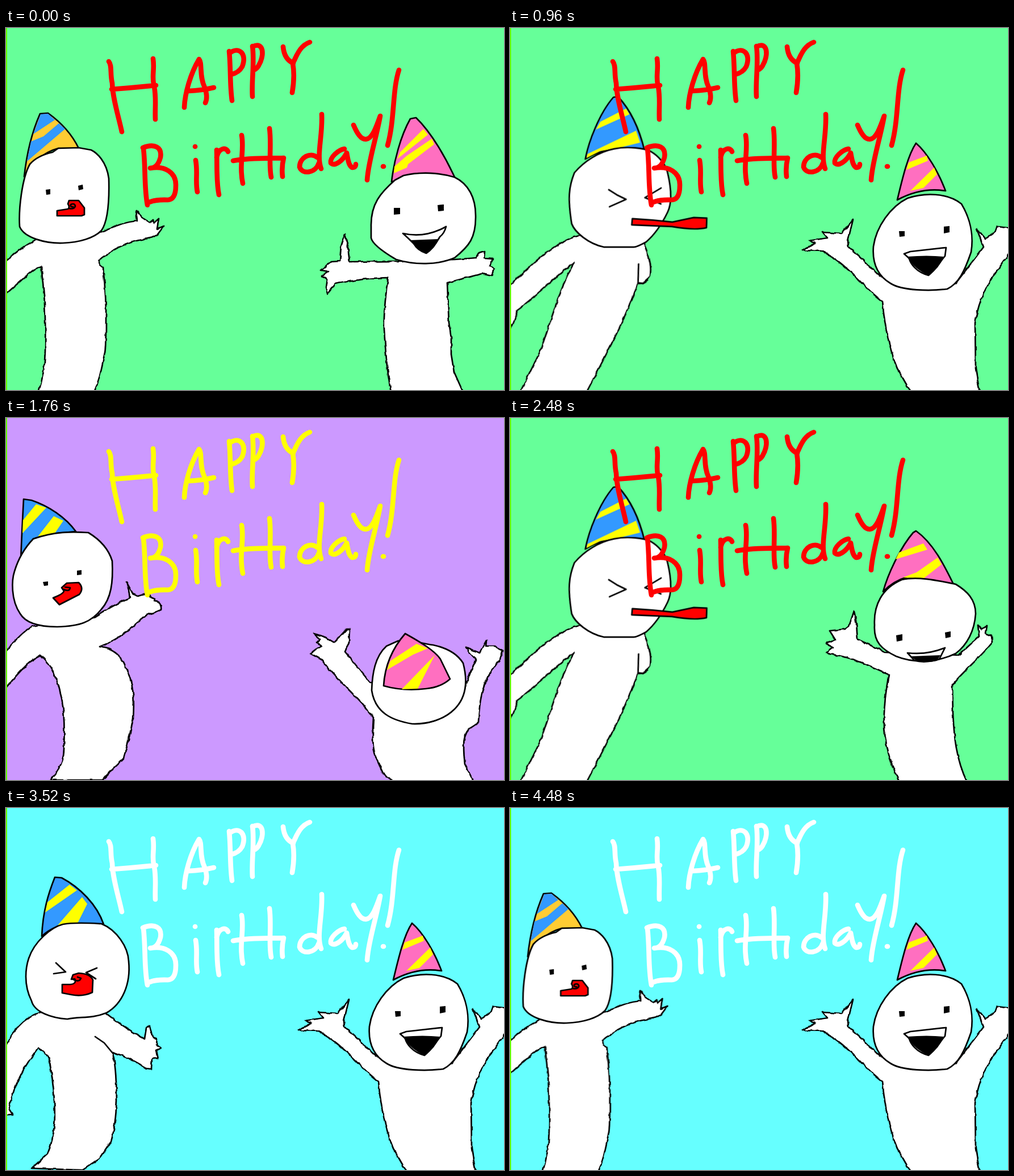
Write an HTML page without scripts that moves like this. It is 877 px wide and 638 px high and loops after 4.64 s.

```html
<!DOCTYPE html>
<html lang="en">
<head>
<meta charset="utf-8">
<title>Happy Birthday!</title>
<style>
html, body { margin: 0; width: 100%; height: 100%; overflow: hidden; }
svg { display: block; width: 100%; height: 100%; animation: disco 4640ms step-end infinite; }

/* one tick is 80 ms, 58 ticks in the loop */
@keyframes disco {
  0%, 10.34%, 20.68%, 31.03%, 41.37%, 51.72%, 62.06%, 72.41%, 82.75%, 93.1% { background: #6f9; color: #f00; }
  3.44%, 13.79%, 24.13%, 34.48%, 44.82%, 55.17%, 65.51%, 75.86%, 86.2%, 96.55% { background: #6ff; color: #fff; }
  6.89%, 17.24%, 27.58%, 37.93%, 48.27%, 58.62%, 68.96%, 79.31%, 89.65% { background: #c9f; color: #ff0; }
}

.pose { visibility: hidden; animation: 4640ms step-end infinite; }
.rest { animation-name: rest; }
.back { animation-name: back; }
.inhale { animation-name: inhale; }
.blow { animation-name: blow; }
.half { animation-name: half; }
.full { animation-name: full; }
.smile { animation-name: smile; }
.dip { animation-name: dip; }
.bow { animation-name: bow; }
.cheer { animation-name: cheer; }

@keyframes rest {
  0%, 25.86%, 58.62%, 91.37% { visibility: visible; }
  3.44%, 36.2%, 68.96% { visibility: hidden; }
}
@keyframes back {
  3.44%, 36.2%, 68.96% { visibility: visible; }
  0%, 8.62%, 41.37%, 74.13% { visibility: hidden; }
}
@keyframes inhale {
  8.62%, 41.37%, 74.13% { visibility: visible; }
  0%, 12.06%, 44.82%, 77.58% { visibility: hidden; }
}
@keyframes blow {
  12.06%, 44.82%, 77.58% { visibility: visible; }
  0%, 25.86%, 58.62%, 91.37% { visibility: hidden; }
}
@keyframes half {
  12.06%, 44.82%, 77.58% { visibility: visible; }
  0%, 15.51%, 48.27%, 81.03% { visibility: hidden; }
}
@keyframes full {
  15.51%, 48.27%, 81.03% { visibility: visible; }
  0%, 25.86%, 58.62%, 91.37% { visibility: hidden; }
}
@keyframes smile {
  0%, 25.86%, 51.72%, 77.58% { visibility: visible; }
  1.72%, 27.58%, 53.44%, 79.31% { visibility: hidden; }
}
@keyframes dip {
  1.72%, 27.58%, 53.44%, 79.31% { visibility: visible; }
  0%, 3.44%, 29.31%, 55.17%, 81.03% { visibility: hidden; }
}
@keyframes bow {
  3.44%, 29.31%, 55.17%, 81.03% { visibility: visible; }
  0%, 15.51%, 41.37%, 67.24%, 93.1% { visibility: hidden; }
}
@keyframes cheer {
  15.51%, 41.37%, 67.24%, 93.1% { visibility: visible; }
  0%, 25.86%, 51.72%, 77.58% { visibility: hidden; }
}

.lean { transform-origin: 0 638px; animation: lean 4640ms step-end infinite; }
@keyframes lean {
  0%, 32.75%, 65.51% { transform: skewX(0deg); }
  12.06%, 44.82%, 77.58% { transform: skewX(0deg); animation-timing-function: steps(5); }
  20.68%, 53.44%, 86.2% { transform: skewX(-5deg); }
  25.86%, 58.62%, 91.37% { transform: skewX(-2.1deg); animation-timing-function: steps(3); }
  31.03%, 63.79%, 96.55%, 100% { transform: skewX(.12deg); }
}

path { fill: #fff; stroke: #000; stroke-width: 2.7; stroke-linejoin: round; stroke-linecap: round; }
.pose > path:first-child { filter: url(#shaky); }
.line { fill: none; }
.blue { fill: #39f; }
.gold { fill: #fc3; }
.pink { fill: #ff6fc0; }
.red { fill: #f00; }
.ink { fill: #000; stroke: none; }
.dye, .sky { fill: #ff0; stroke: none; }
.sky { fill: #39f; }
.words path { fill: none; stroke: currentColor; stroke-width: 8.6; }
</style>
</head>
<body>
<svg viewBox="0 0 877 638" preserveAspectRatio="none">

<!-- unsteady hand for the body outlines -->
<filter id="shaky" filterUnits="userSpaceOnUse" x="-60" y="0" width="960" height="650" color-interpolation-filters="sRGB">
  <feTurbulence type="fractalNoise" baseFrequency=".11" seed="4"/>
  <feDisplacementMap in="SourceGraphic" scale="5" xChannelSelector="R" yChannelSelector="G"/>
</filter>

<g class="lean">
  <g class="pose rest">
    <path d="M-8 417Q20 391 53 373L165 360L188 352Q204 343 230 340L229 330L231 322L238 333L253 343L259 338L261 343L269 336L266 354L278 349L266 365L258 369C235 374 215 377 190 391L163 410L166 418L171 423C174 450 177 480 176 520Q176 560 174 572C168 600 165 620 155 642H57Q68 610 69 570C70 520 68 480 66 460L62 420Q52 423 44 430Q25 446-8 476Z"/>
    <path class="gold" d="M32 262C36 225 45 185 60 151L74 150C95 165 115 185 128 212L92 212Q55 222 32 262Z"/>
    <path class="sky" d="M61 152L74 151L86 162L48 187ZM44 200L66 191L93 168L104 178L37 235Z"/>
    <path d="M82 219Q55 225 42 240C28 265 22 320 24 350C32 370 70 380 100 379C130 378 155 370 168 357C180 340 182 300 181 265C177 235 160 220 150 215L128 211L92 212L82 219Z"/>
    <path class="ink" d="M70 285l8-1v9l-7 1zM127 278l8-2 1 8-8 2z"/>
    <path class="red" d="M90 322L109 319Q113 316 109 310L111 304L128 304L138 317V329L133 331L90 331Z"/>
    <path class="line" d="M111 318Q120 320 122 314Q121 308 114 311Q113 316 118 315"/>
  </g>

  <g class="pose back">
    <path d="M-8 420Q20 385 45 367L154 352Q190 329 218 317L216 303L212 289L223 309L233 313L250 308L255 316L262 319L261 323Q275 324 273 338Q262 343 254 345Q240 350 232 360Q200 390 165 403L181 407Q203 417 210 437C226 470 226 500 224 530C216 570 211 585 207 600L188 618L170 638H78L88 626Q103 605 102 580Q104 530 99 500C92 460 80 435 60 418C38 430 15 455-8 488Z"/>
    <path class="blue" d="M26 250Q28 200 31 143L45 145C75 155 105 175 123 200L80 204L48 213Z"/>
    <path class="dye" d="M53 152L71 158L29 203L30 180ZM84 173L101 181L86 203L56 209Z"/>
    <path d="M48 213C85 200 115 200 145 202Q178 222 187 252C189 290 185 318 168 337C150 360 130 367 90 368C60 368 35 362 25 345C8 320 10 285 15 270Q25 237 48 213Z"/>
    <path class="ink" d="M65 289l9-1v7l-7 1zM125 269l8-1v8l-8 1z"/>
    <path class="red" d="M83 317Q101 310 102 305L98 299L107 291L128 290Q138 300 129 311L94 329Z"/>
    <path class="line" d="M101 302Q112 307 113 299L104 298"/>
  </g>

  <g class="pose inhale">
    <path d="M-8 436C10 392 30 370 60 360L175 361Q205 385 244 407L247 388L253 384L258 404L266 408L265 417L273 423L264 427L267 441L257 442L256 460L247 459Q225 443 187 430Q194 450 195 515Q193 560 185 588L165 618L135 638L45 635L73 610C90 570 86 530 84 500C80 460 76 435 69 433L57 422C40 445 15 480 5 530L12 541L-8 542Z"/>
    <path class="line" d="M157 403L173 414L187 431"/>
    <path class="blue" d="M63 226C65 180 75 150 86 122L98 123C130 140 160 170 172 205L120 203Q85 205 63 226Z"/>
    <path class="dye" d="M73 166L112 135L125 145L69 184ZM134 157L143 169L126 203L89 209Z"/>
    <path d="M100 205C120 201 150 203 168 204C195 215 215 245 216 270C220 310 205 345 177 361C150 372 130 367 108 372C80 370 50 360 45 340C30 310 35 280 40 265C50 235 80 210 100 205Z"/>
    <path class="line" d="M88 273L105 289L84 292M160 282L141 290L158 301"/>
    <path class="red" d="M99 311L113 311Q125 310 121 301L115 302L118 294L128 291Q148 292 153 303L152 325Q135 333 115 329L99 326Z"/>
    <path class="line" d="M118 302Q129 308 132 300L126 298"/>
  </g>

  <g class="pose blow">
    <path d="M-40 474L-3 440C25 410 60 375 98 366L213 380Q232 415 229 438Q222 452 208 450C190 520 168 565 135 642H18L45 576C62 520 69 465 93 414C62 437 30 475-1 498L1 503L-6 525L-14 532Z"/>
    <path class="line" d="M207 416L209 449L218 450"/>
    <path class="blue" d="M97 231C100 200 115 150 137 122L145 121Q180 155 200 216Q165 208 146 213Q120 216 97 231Z"/>
    <path class="dye" d="M118 165L161 142L168 152L111 179ZM100 222L182 181L191 202L155 211L122 217L99 229Z"/>
    <path d="M146 213C170 208 200 212 210 217C225 225 240 240 245 258C255 290 256 310 250 325C240 350 230 365 217 377Q200 387 195 386L143 386C115 380 90 360 83 345C72 300 72 280 80 255C95 235 120 218 146 213Z"/>
    <path class="line" d="M143 285L158 294L175 302L147 315M235 282L208 299L237 310"/>
    <path class="red pose half" d="M178 338L217 336Q226 330 222 324L211 322L218 317L245 317L256 333V342L240 348Q215 350 200 357L172 358Z"/>
    <path class="red pose full" d="M189 336Q225 338 260 342L297 334L320 335L321 352Q300 357 260 350L189 347Z"/>
  </g>
</g>

<g class="pose smile">
  <path d="M687 411L605 412L602 385L597 363L590 385L588 411L572 412L554 427L568 429L556 437L566 443L564 457L567 468L579 451C610 445 645 440 673 440C668 470 665 510 666 530C668 570 672 610 678 642H805L789 606L784 575V545L780 520L777 449L838 433L855 437L859 425L852 419L857 407L842 406L843 394L833 397L828 405L790 408Z"/>
  <path class="pink" d="M679 271C683 235 695 190 712 160L722 158C750 185 775 230 791 265Q740 250 679 271Z"/>
  <path class="dye" d="M694 219L735 178L743 188L689 231ZM750 195L754 205L708 240L706 246L683 256L684 244L706 225Z"/>
  <path d="M700 260C730 253 765 255 790 263C815 275 827 300 827 330C828 370 815 385 790 405C760 418 720 418 687 408C665 395 645 380 643 370V350C642 310 660 290 685 268Z"/>
  <path class="ink" d="M683 317h11v11l-11 1zM760 312l11-1v11l-10 1z"/>
  <path d="M699 362Q738 371 775 350Q772 362 764 368Q752 390 740 397Q725 392 718 380Q708 370 699 362Z"/>
  <path class="ink" d="M711 374L762 372L754 386L740 398L727 391Z"/>
</g>

<g class="pose dip">
  <path d="M667 452C640 440 610 425 580 419L563 416L558 412L568 404L557 398L573 391L563 375L590 372L597 367L606 340L610 362L612 390L660 412L790 418L826 385L824 365L830 372L840 366L838 380L848 384L849 396C830 420 800 445 779 470L780 520C782 560 785 600 805 642H686C665 600 657 560 659 520C660 490 664 470 667 452Z"/>
  <path class="pink" d="M657 306C667 270 690 225 710 202L715 199C745 220 765 260 781 293Q740 285 700 280Q675 287 657 306Z"/>
  <path class="dye" d="M685 237L728 221L735 232L679 249ZM753 246L760 258L728 283L692 281L716 272Z"/>
  <path d="M690 285C720 278 760 288 785 293C805 305 820 320 820 345C818 375 805 400 785 415C750 432 710 432 680 420C655 408 640 395 642 365C640 330 655 300 690 285Z"/>
  <path class="ink" d="M680 383l11-2v11l-10 2zM766 378l10-2v10l-9 2z"/>
  <path d="M700 414Q735 418 766 405L756 425Q730 433 712 427Z"/>
  <path class="ink" d="M706 420L758 418L752 428Q735 432 716 428Z"/>
</g>

<g class="pose bow">
  <path d="M641 466L597 412L604 395L605 372L600 372L578 396L560 385L542 380L553 390L547 396L556 402L545 408L536 415L556 426C575 455 620 490 647 528C645 560 645 580 652 600L665 628L685 642H824L808 610C805 580 803 555 820 545L832 537C833 500 840 470 852 450L870 425L875 410L860 402H845L846 392L834 414L810 404L815 412L828 426Q818 445 808 476Z"/>
  <path d="M690 393C710 388 730 398 752 400Q790 408 805 432C815 470 808 495 790 513C770 533 740 540 715 539C680 533 650 520 644 480C645 450 650 420 670 402Z"/>
  <path class="pink" d="M665 472Q668 420 703 380C730 395 755 410 765 425L782 460Q765 475 740 477Q700 482 665 472Z"/>
  <path class="dye" d="M677 428L723 398L743 406L717 417L671 444ZM755 418L725 477L697 478Z"/>
</g>

<g class="pose cheer">
  <path d="M651 437L596 385L595 375L604 338L584 362L550 360L558 370L527 375L538 379L514 392L550 393L572 407C600 425 620 455 656 482C660 530 670 570 682 600L706 642H827L820 600L819 520C825 480 840 450 860 425L884 390V352L858 349L855 358L837 372L822 354L834 386L785 450Z"/>
  <path d="M700 300C730 290 770 290 795 310C810 335 817 365 812 395C800 430 790 450 770 460C740 464 690 463 670 450C645 435 638 410 640 385C645 350 670 315 700 300Z"/>
  <path class="pink" d="M682 303C690 270 700 225 715 203C735 220 755 255 767 287Q725 280 682 303Z"/>
  <path class="dye" d="M702 237L734 225L736 234L698 250ZM747 246L752 258L728 282L705 287Z"/>
  <path class="ink" d="M685 358h10v9l-9 1zM764 350l10-1v11l-10 2z"/>
  <path d="M694 398L705 394L768 387L766 402C755 415 750 425 737 436C715 430 705 415 703 406Z"/>
  <path class="ink" d="M699 403Q735 400 764 403Q755 425 737 436Q712 425 699 403Z"/>
</g>

<g class="words">
  <path d="M181 59C187 66 183 80 187 97C188 125 198 155 204 183M259 54C262 75 256 85 261 103C265 125 262 140 263 161M186 108Q225 105 264 101"/>
  <path d="M314 140C315 115 325 80 340 55C346 62 340 85 350 105Q356 122 351 132M321 111Q345 110 366 105"/>
  <path d="M393 41C396 70 394 100 398 128M394 44C410 32 425 45 416 68Q410 79 396 82M434 32C438 60 432 95 434 121M434 33C455 22 455 50 445 66Q442 72 436 74"/>
  <path d="M488 33Q490 55 506 62M535 25C515 32 510 55 505 62Q509 85 504 114"/>
  <path d="M242 212C246 245 243 280 249 312M241 211C262 203 275 210 272 228Q267 247 254 247C280 242 300 255 299 278Q299 302 285 303Q262 302 250 308"/>
  <path d="M333 209h.1M334 233C338 255 333 270 337 289M371 215C372 245 370 270 375 294M371 228C375 210 388 210 391 218"/>
  <path d="M415 189C420 215 410 240 417 274M400 234C430 228 470 230 489 229Q485 245 487 262M464 177C468 205 462 240 467 263"/>
  <path d="M556 152C558 190 546 225 555 248M548 228C536 218 517 228 517 245C522 259 545 256 551 238"/>
  <path d="M596 213C585 215 570 228 572 238C578 244 592 236 600 220C602 230 603 243 610 246Q616 246 616 240"/>
  <path d="M612 171C618 185 625 197 634 196C645 195 652 175 659 155C652 195 638 235 636 268"/>
  <path d="M692 74C680 110 685 160 672 207M664 244h1"/>
</g>

<rect width="2" height="638" fill="#6f0"/>
</svg>
</body>
</html>
```
